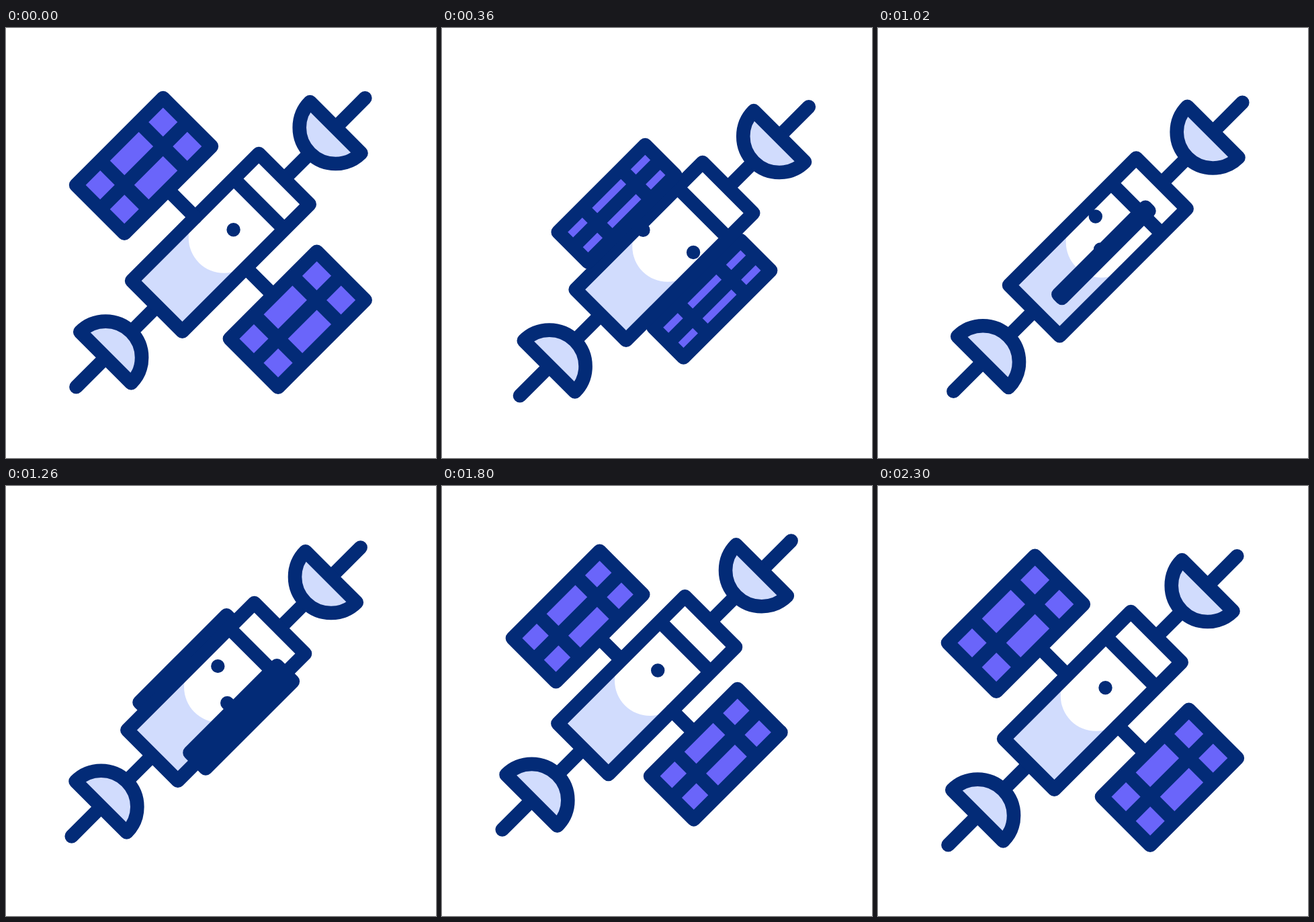
Animation of 640x640 px, one loop 2.4 s. Source, as an HTML page:

```html
<!DOCTYPE html>
<html lang="en">
<head>
<meta charset="utf-8">
<title>Satellite</title>
<style>
  html, body { margin: 0; width: 100%; height: 100%; overflow: hidden; background: #fff; }
  svg { display: block; width: 100vw; height: 100vh; }
  .line { fill: none; stroke: #032b77; stroke-width: 20.6; stroke-linecap: round; stroke-linejoin: round; }
  .pale { fill: #d1dcfd; }
  .cell { fill: #6a65fa; }
</style>
</head>
<body>
<svg viewBox="0 0 640 640">
  <defs>
    <g id="dish">
      <path class="line" d="M134 0H188M242 0H304"/>
      <path class="line pale" style="fill:#d1dcfd" d="M242 -53.8A53.8 53.8 0 0 0 242 53.8Z"/>
    </g>
  </defs>
  <g id="craft">
    <g id="back"></g>
    <use href="#dish"/>
    <use href="#dish" transform="rotate(180)"/>
    <rect x="-133.8" y="-53.3" width="267.6" height="106.6" fill="#fff"/>
    <rect class="pale" x="-133.8" y="-53.3" width="133.8" height="106.6"/>
    <circle cx="8.5" cy="-1.5" r="52.6" fill="#fff"/>
    <circle id="dot" r="10.2" fill="#032b77"/>
    <path class="line" d="M-133.8 -53.3H133.8V53.3H-133.8ZM81 -53.3V53.3"/>
    <g id="front"></g>
  </g>
</svg>
<script>
const LOOP = 2400, SPIN = 1900, FLIP = 600;
const INNER = 110.9, OUTER = 213, HALF = 91.7, RIB = 40.6;
// time, x, y of the drifting craft
const DRIFT = [[0, 0, 0], [667, 20.5, 23.2], [1600, -18.4, -28.4], [2300, 0, 0]];
const get = id => document.getElementById(id);
const craft = get('craft'), dot = get('dot');

function makePanel(parent) {
  return ['cell', 'line'].map(name => {
    const path = document.createElementNS('http://www.w3.org/2000/svg', 'path');
    path.setAttribute('class', name);
    parent.append(path);
    return path;
  });
}
const back = makePanel(get('back')), front = makePanel(get('front'));

// k is the panel's signed foreshortening, from -1 to 1
function setPanel([cells, lines], k) {
  const a = INNER * k, b = OUTER * k, mid = (a + b) / 2;
  const root = Math.sign(k) * Math.min(72 * Math.abs(k), 53.3);
  const frame = `M${-HALF} ${a}H${HALF}V${b}H${-HALF}Z`;
  cells.setAttribute('d', frame);
  lines.setAttribute('d', `${frame}M${-HALF} ${mid}H${HALF}` +
    `M${-RIB} ${a}V${b}M${RIB} ${a}V${b}M0 ${root}V${a}`);
}

function driftAt(t) {
  for (let i = 1; i < DRIFT.length; i++) {
    const [t0, x0, y0] = DRIFT[i - 1], [t1, x1, y1] = DRIFT[i];
    if (t < t1) {
      const p = (t - t0) / (t1 - t0), e = p * p * (3 - 2 * p);
      return [x0 + (x1 - x0) * e, y0 + (y1 - y0) * e];
    }
  }
  return [0, 0];
}

function draw(now) {
  const t = now % LOOP;
  const [x, y] = driftAt(t);
  craft.setAttribute('transform', `translate(${319.4 + x} ${319.3 + y}) rotate(-45)`);

  const k = 2 * Math.min(t / SPIN, 1) - 1;
  setPanel(front, k);
  setPanel(back, -k);

  // the dot leaves over one edge and comes back over the other
  const side = t < FLIP ? t * 0.0878 : Math.min(0, (t - SPIN) * 0.0394);
  dot.setAttribute('cx', 27 + Math.abs(side) * 0.075);
  dot.setAttribute('cy', side);
}

const start = performance.now();
function tick() {
  draw(performance.now() - start);
  requestAnimationFrame(tick);
}
tick();
</script>
</body>
</html>
```
